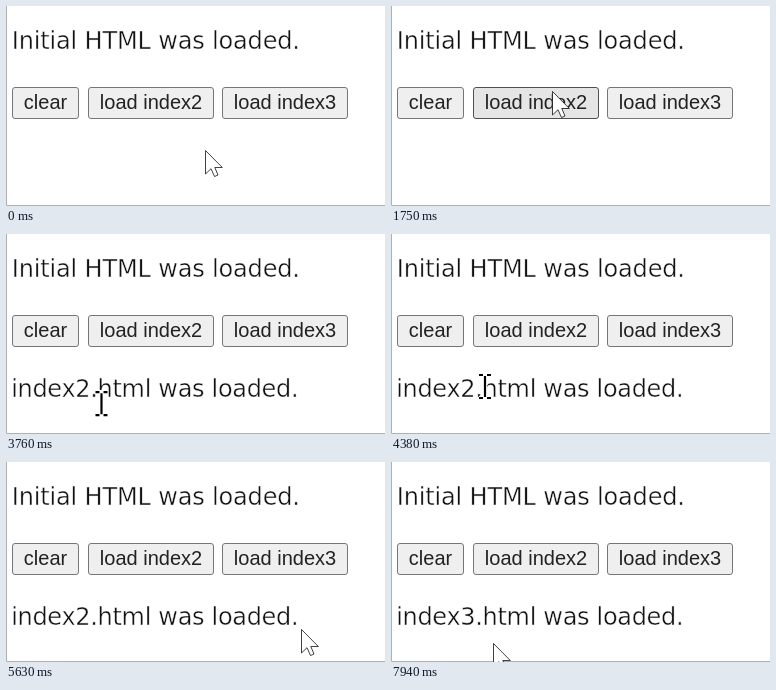
These frames come from a looping animation (379 by 200 pixels, 8000 ms). An HTML page:

```html
<!DOCTYPE html>
<html lang="en">
<head>
<meta charset="utf-8">
<title>Loading pages</title>
<style>
  html, body { margin: 0; width: 100%; height: 100%; overflow: hidden; background: #fff; }
  svg { display: block; width: 379px; height: 200px; }
  /* The thin white outline gives the page text its light weight. */
  .page { font: 24px "DejaVu Sans", Verdana, sans-serif; fill: #111; stroke: #fff; stroke-width: .45; }
  .button rect { fill: #efefef; stroke: #767676; }
  .button text { font: 20px "Liberation Sans", Arial, sans-serif; text-anchor: middle; fill: #222; }
  .button.hover rect { fill: #e5e5e5; stroke: #4f4f4f; }
  .button.pressed rect { fill: #f5f5f5; stroke: #8d8d8d; }
</style>
</head>
<body>
<svg viewBox="0 0 379 200">
  <path d="M.5 0V199.5H379" fill="none" stroke="#b0b0b0"/>
  <g class="page">
    <text x="5.8" y="43" letter-spacing="-.16">Initial HTML was loaded.</text>
    <text id="loaded" x="5.2" y="163" letter-spacing="-.31"></text>
  </g>
  <g id="buttons"></g>
  <circle id="click" r="17.5" fill="#ff0" fill-opacity=".45"/>
  <path id="arrow" d="M.5 .5V24L6 18.7L9.5 26.5L13 25L9.8 17.5H17.3Z" fill="#fff" stroke="#111" stroke-width=".8"/>
  <g id="beam" fill="none">
    <path id="beamShape" d="M-6-11H6M0-11V12M-6 12H6" stroke="#fff" stroke-width="4.5"/>
    <use href="#beamShape" style="display:none"/>
    <path d="M-6-11H-2M2-11H6M0-10V11M-6 12H-2M2 12H6" stroke="#000" stroke-width="2.2"/>
  </g>
</svg>
<script>
const LOOP = 8000;
const byId = id => document.getElementById(id);
const within = ([x, y], left, top, right, bottom) =>
  x >= left && x < right && y >= top && y < bottom;

// Each move goes from the previous resting point to (x, y); sag bows it downwards.
const home = { x: 199, y: 144 };
const moves = [
  { start: 500, end: 660, x: 175, y: 35 },
  { start: 1110, end: 1490, x: 161, y: 85 },
  { start: 1880, end: 2090, x: 219, y: 129 },
  { start: 3250, end: 4040, x: 46, y: 125, sag: 55 },
  { start: 4070, end: 4380, x: 94, y: 152, sag: -25 },
  { start: 4450, end: 4520, x: 57, y: 170 },
  { start: 4760, end: 5080, x: 297, y: 87 },
  { start: 5340, end: 5630, x: 295, y: 167 },
  { start: 6660, end: 7180, x: 74, y: 183, sag: 10 },
  { start: 7250, end: 7460, x: 120, y: 125 },
  { start: 7510, end: 7740, x: 102, y: 181 }
];
const clicks = [1690, 5280];
const CLICK_LENGTH = 60;

const buttons = [
  { label: "clear", x: 6, width: 67 },
  { label: "load index2", x: 82, width: 126 },
  { label: "load index3", x: 216, width: 126 }
];
byId("buttons").innerHTML = buttons.map(({ label, x, width }) => `
  <g class="button">
    <rect x="${x + .5}" y="81.5" width="${width - 1}" height="31" rx="2.5"/>
    <text x="${x + width / 2}" y="103">${label}</text>
  </g>`).join("");
const buttonNodes = document.querySelectorAll(".button");

const ease = k => k * k * (3 - 2 * k);

function pointerAt(time) {
  let { x, y } = home;
  for (const move of moves) {
    if (time < move.start) break;
    const k = ease(Math.min(1, (time - move.start) / (move.end - move.start)));
    x += (move.x - x) * k;
    y += (move.y - y) * k + (move.sag || 0) * Math.sin(Math.PI * k);
  }
  return [x, y];
}

function place(id, [x, y], visible) {
  byId(id).setAttribute("transform", `translate(${x} ${y})`);
  byId(id).setAttribute("visibility", visible ? "visible" : "hidden");
}

function draw(time) {
  const pointer = pointerAt(time);
  const message = time < 2880 ? "" : `index${time < 6290 ? 2 : 3}.html was loaded.`;
  const pressed = clicks.some(t => time >= t && time < t + CLICK_LENGTH);
  const overText = within(pointer, 6, 18, 293, 51) ||
    (message !== "" && within(pointer, 6, 138, 291, 172));

  byId("loaded").textContent = message;
  buttons.forEach(({ x, width }, i) => {
    const hover = within(pointer, x, 81, x + width, 113);
    buttonNodes[i].classList.toggle("hover", hover);
    buttonNodes[i].classList.toggle("pressed", hover && pressed);
  });
  place("click", pointer, pressed);
  place("arrow", pointer, !overText);
  place("beam", pointer, overText);
}

const start = performance.now();
function tick() {
  draw((performance.now() - start) % LOOP);
  requestAnimationFrame(tick);
}
tick();
</script>
</body>
</html>
```
